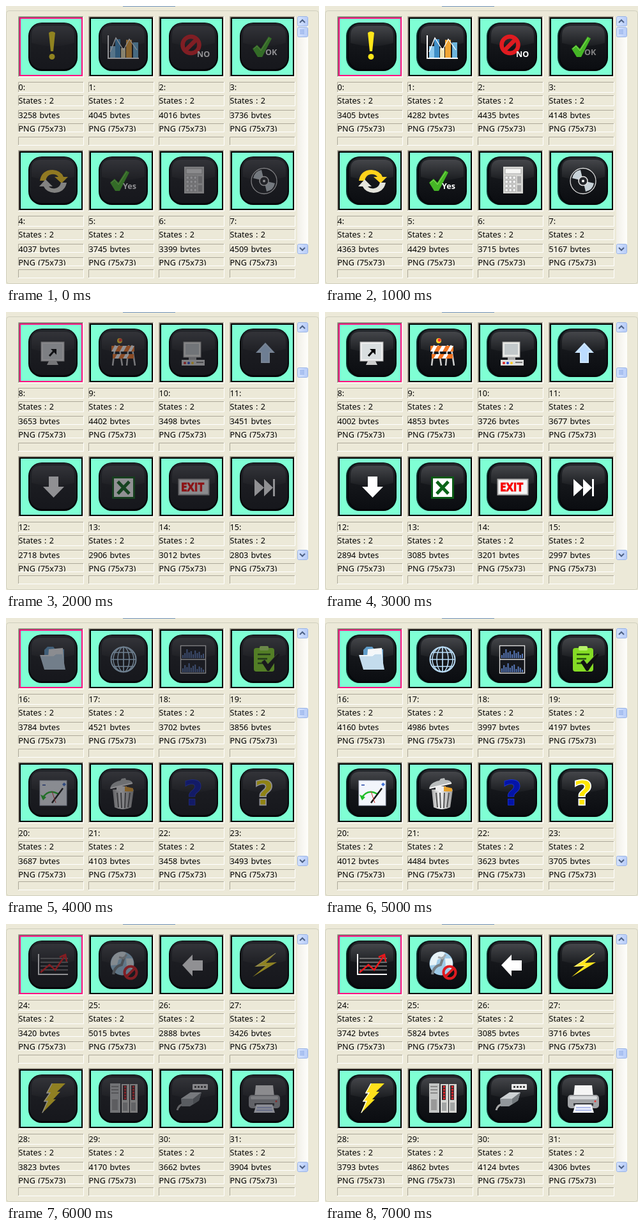
These frames come from a looping animation (490 px wide and 436 px high, 8000 ms). An HTML page:

```html
<!DOCTYPE html>
<html lang="en">
<head>
<meta charset="utf-8">
<title>Button browser</title>
<style>
html, body { margin: 0; width: 100%; height: 100%; overflow: hidden; background: #ece9d8; }
svg { display: block; }
text { font: 12.6px "Noto Sans", sans-serif; word-spacing: 1px; white-space: pre; }
.tag { font: bold 12.6px "Open Sans", sans-serif; }
.exit { font: bold 17px "Open Sans", sans-serif; stroke: #e00; stroke-width: .8; }
.query { font: bold 54px "DejaVu Sans", sans-serif; text-anchor: middle; }
.veil, .dim .glow { display: none; }
.dim .veil { display: block; }
.dim .ok { fill: #fff; }
</style>
</head>
<body>
<svg width="490" height="436" viewBox="0 0 490 436">
  <defs>
    <linearGradient id="plate" x2="0" y2="1">
      <stop stop-color="#25272c"/><stop offset=".45" stop-color="#15171b"/><stop offset="1" stop-color="#0b0d11"/>
    </linearGradient>
    <linearGradient id="gloss" x2="0" y2="1">
      <stop stop-color="#fff" stop-opacity=".15"/><stop offset="1" stop-color="#fff" stop-opacity=".03"/>
    </linearGradient>
    <linearGradient id="metal"><stop stop-color="#aaa"/><stop offset=".4" stop-color="#f4f4f4"/><stop offset="1" stop-color="#999"/></linearGradient>
    <linearGradient id="knob"><stop stop-color="#d6e4ff"/><stop offset="1" stop-color="#b6cbf8"/></linearGradient>
    <linearGradient id="track"><stop stop-color="#f1efe8"/><stop offset="1" stop-color="#fefefb"/></linearGradient>
  </defs>
  <path d="M183 .5h82" stroke="#7396c0"/>
  <rect x=".5" y="7.5" width="489" height="428" rx="4" fill="none" stroke="#cfcebd"/>
  <g id="view"></g>
</svg>
<script>
const fill = (d, color) => `<path d="${d}" fill="${color}"/>`;
const line = (d, color, w = 1) => `<path d="${d}" fill="none" stroke="${color}" stroke-width="${w}"/>`;
const rect = (x, y, w, h, color, extra = '') => `<rect x="${x}" y="${y}" width="${w}" height="${h}" fill="${color}" ${extra}/>`;
const disc = (x, y, r, color, extra = '') => `<circle cx="${x}" cy="${y}" r="${r}" fill="${color}" ${extra}/>`;
const label = (x, y, s, color = '#000', cls = '', extra = '') => `<text x="${x}" y="${y}" fill="${color}" class="${cls}" ${extra}>${s}</text>`;
const repeat = (n, draw) => Array.from({ length: n }, (_, i) => draw(i)).join('');

const check = dx => fill(`M${55 + dx} 67l7-6 6 6 12-19 5 3-15 29h-7z`, '#45b526') +
  line(`M${57 + dx} 67l5-4 6 7 13-20`, '#8de05a');
const forbid = (x, y, r, w) => disc(x, y, r, 'none', `stroke="#e01b20" stroke-width="${w}"`) +
  line(`M${x - r * .7} ${y + r * .7}L${x + r * .7} ${y - r * .7}`, '#e01b20', w);
const bars = (y, heights) => heights.map((h, i) => rect(56 + i * 3.2, y - h, 2, h, '#5878b8')).join('');

// Glyphs share the coordinates of the first cell.
const glyphs = [
  () => fill('M67 42q5-4 10 0l-3 29h-4z', '#ffe619') + disc(72, 79.5, 4.5, '#ffe619'),
  () => rect(53, 63, 8, 18, '#8cc8ec') + rect(61, 52, 8, 29, '#3f8fc8') + rect(70, 66, 7, 15, '#f0e3b4') +
    rect(78, 53, 9, 28, '#f0a535') + rect(89, 57, 8, 24, '#6db4dc') +
    line('M50 46v36h48', '#fff', 2) + line('M53 72l9-22 12 19 9-17 12 17', '#fff', 1.3),
  () => forbid(69.5, 61, 13, 6.5) + label(79, 80, 'NO', '#fff', 'tag'),
  () => check(0) + label(75, 77, 'OK', '#858585', 'tag ok'),
  () => fill('M53 64Q56 47 73 47 86 48 90 58h7l-10 10-11-10h6q-4-5-11-4-7 1-9 10z', '#ffd21c') +
    fill('M95 67Q92 82 76 83 63 82 59 73h-7l10-11 11 11h-6q4 4 10 3 7-1 9-9z', '#e4e4dc'),
  () => check(-2) + label(73, 77, 'Yes', '#fff', 'tag'),
  () => rect(59, 42, 31, 42, '#d6d6d3') + rect(62, 45, 25, 8, '#f6f6f4', 'stroke="#aaa"') +
    repeat(12, i => rect(62 + i % 3 * 6, 57 + (i / 3 | 0) * 6.5, 4.5, 4.5, '#f4f4f4', 'stroke="#999" stroke-width=".7"')) +
    rect(81, 57, 6, 11, '#aaa') + rect(81, 71, 6, 10, '#aaa'),
  () => disc(73, 64.5, 20, '#191b1f', 'stroke="#ddd" stroke-width="1.3"') +
    fill('M73 64L56 60Q58 49 69 47zM73 64l17 4Q88 79 77 81z', '#c8d2d8') +
    disc(73, 64.5, 7, '#24262b', 'stroke="#e4e4e4" stroke-width="1.5"') + disc(73, 64.5, 2, '#fff'),
  () => rect(55, 47, 36, 30, '#eee', 'stroke="#aaa"') + rect(58, 50, 30, 24, '#d9dedf') +
    fill('M67 77h12l3 6H64z', '#ccc') + line('M68 69l8-9', '#000', 3) + fill('M70 58h9v9z', '#000'),
  () => line('M61 52l-4 32M67 52l5 32M82 52l-3 32M87 52l5 32', '#cfcfcf', 2.5) +
    rect(55, 53, 36, 9, '#f47522') + rect(57, 66, 33, 7, '#f47522') +
    fill('M60 53h6l-5 9h-6zM73 53h6l-5 9h-6zM86 53h5l-5 9h-5zM64 66h6l-4 7h-6zM77 66h6l-4 7h-6z', '#fff') +
    disc(68, 45, 4, '#ffd52a') + disc(69, 44, 2.5, '#f33'),
  () => rect(58, 47, 27, 24, '#e9e9e6', 'stroke="#999"') + rect(61, 50, 21, 17, '#c2c8ca') + rect(66, 71, 12, 4, '#aaa') +
    rect(55, 75, 36, 9, '#ddd') + disc(60, 80, 2, '#d22') + disc(66, 80, 2, '#24c') + disc(72, 80, 2, '#fc2') + rect(78, 78, 11, 2, '#777'),
  () => fill('M75 48l15 16h-8v16H68V64h-8z', '#bcdcff') + line('M75 50l12 13h-6v16H69V63h-6z', '#e4f2ff'),
  () => fill('M67 48h15v16h9L74.5 81 58 64h9z', '#fff'),
  () => rect(57.5, 49.5, 33, 32, '#fff', 'stroke="#0a5a14" stroke-width="3"') + line('M65 56l18 19M83 56L65 75', '#0b6418', 5),
  () => rect(50.5, 52.5, 47, 24, '#f6f6f6', 'stroke="#aaa" stroke-width="2"') + label(54, 70.5, 'EXIT', '#f00', 'exit'),
  () => fill('M58 52l15 13.5L58 79zM73 52l14 13.5L73 79zM87 52h3v27h-3z', '#fff'),
  () => fill('M60 50l5-5h9l3 4h14v26H60z', '#5f9cc9') + fill('M67 49l22-2 2 26H65z', '#f5f7f9') +
    fill('M53 58h21l4-3h10l5 26H60z', '#c4dced') + line('M54 59h20l4-3h10', '#fff', 1.5),
  () => disc(74, 65, 19.5, 'none', 'stroke="#b9dcf6" stroke-width="2"') +
    line('M74 45v40M54 65h40M58 54h32M58 76h32', '#b9dcf6', 1.7) +
    [9, 16].map(r => `<ellipse cx="74" cy="65" rx="${r}" ry="19.5" fill="none" stroke="#b9dcf6" stroke-width="1.5"/>`).join(''),
  () => rect(53.5, 43.5, 39, 43, '#15171c', 'stroke="#ddd" stroke-width="1.4"') + line('M53 65h40', '#ddd', 1.4) +
    bars(63, [5, 8, 14, 9, 11, 6, 12, 8, 10, 5, 7]) + bars(85, [6, 11, 8, 14, 7, 10, 12, 5, 9, 7, 4]),
  () => rect(57, 47, 32, 37, '#85dc25', 'rx="4"') + rect(66, 44, 14, 7, '#b6f06a', 'rx="2"') +
    line('M63 57h20M63 64h15M63 71h12', '#27540c', 2.5) +
    fill('M69 69l5-4 5 7 15-16 4 1-17 26h-3z', '#111') + line('M69 69l5-4 5 7 15-16', '#699d48', .7),
  () => rect(53, 45, 42, 39, '#f2f5fb', 'stroke="#b5bdcf"') + line('M57 52h5', '#5670bb', 2) + fill('M88 51l3-3 3 3-3 3z', '#4374d8') +
    line('M57 73q9-16 25-7', '#20bd28', 2.5) + line('M72 80l17-23', '#151515', 2.5) + line('M72 62l6 18', '#c33') + fill('M54 67l4 9 5-5z', '#20bd28'),
  () => fill('M57 59h33l-4 28q-13 6-26 0z', 'url(#metal)') + line('M64 64l2 23M70 64l1 24M77 64l-1 24M84 64l-3 23', '#555', 2) +
    rect(63, 54, 16, 7, '#eee') + fill('M76 54l13 3v5H76z', '#e7a22d') +
    fill('M53 58q1-10 16-13l2-3 6-1 1 3q9 0 10 5z', '#b9bdbd') + line('M54 57l34-8', '#f4f4f4', 2),
  () => label(73, 83, '?', '#0414a8', 'query', 'stroke="#1d35d8" stroke-width=".8"'),
  () => label(73, 83, '?', '#ffe600', 'query', 'stroke="#fff" stroke-width="1.8"'),
  () => line('M54 54h43M54 60h43M54 66h43M54 72h43', '#888', 1.3) + line('M51 47v32h46', '#fff', 2) +
    line('M54 76l14-12 9 8 15-22', '#e8181c', 2.5) + line('M84 52l9-4 2 11', '#e8181c', 2.5),
  () => disc(72, 62, 18.5, '#9fcbe8') + fill('M60 48q9-7 18-3l-4 8-8 3-2 8-10 1q0-10 6-17zM78 54h10q4 10-1 17l-8-4z', '#e8f3f7') +
    line('M58 79q2-13 13-15l4-12', '#777f84', 4) + line('M67 52l7 2 5-6', '#a7adb0', 3) + forbid(85, 76, 9.5, 4),
  () => fill('M56 64.5L72 48v9h16v16H72v9z', '#fff'),
  () => fill('M92 45L58 67l17-1-20 17 38-23-17 1z', '#ffe61c') + line('M91 46L61 66l16-1', '#fff7a8'),
  () => fill('M72 40h21L80 53h5L74 65h4L56 87l8-19h-5l9-13h-5z', '#ffe01c') + line('M72 40l-8 15h5l-9 13h5l-8 18', '#fff', 1.3),
  () => rect(53, 40, 16, 46, '#c4c6c5') + line('M55 45h11M55 50h11M55 55h11', '#777', 1.5) + rect(56, 65, 9, 17, '#999') +
    [71, 84].map(x => rect(x, 41, 12, 45, '#d5d5d2') + rect(x + 2, 43, 6, 23, '#34262a') +
      repeat(5, i => rect(x + 4, 44 + i * 4.5, 3, 3, '#e3262c')) + rect(x + 2, 70, 7, 13, '#a3a5a5')).join(''),
  () => rect(72, 41, 24, 9, '#ececec', 'rx="1"') + repeat(4, i => rect(75 + i * 5, 44, 3, 3, '#444')) +
    line('M62 71q-12 2-14 11', '#aaa', 3) + fill('M54 64l15-10h17l-4 13-14 9H55z', '#92979b') + fill('M54 64l15-10h17l-13 10z', '#cdd1d3') + fill('M73 64l13-10-4 13-9 6z', '#73797d'),
  () => fill('M60 43h27l2 18H58z', '#f5f5f5') + rect(49, 58, 49, 21, '#a2a4a7', 'rx="5"') + rect(52, 60, 43, 5, '#d8dadc', 'rx="2"') +
    rect(58, 71, 31, 4, '#37393d') + fill('M61 73h25l4 13H57z', '#f2f5ff') + line('M62 78h23M61 82h25', '#6f83d8') + disc(92, 68, 1.5, '#e33')
];

const dimBytes = [
  3258, 4045, 4016, 3736, 4037, 3745, 3399, 4509, 3653, 4402, 3498, 3451, 2718, 2906, 3012, 2803,
  3784, 4521, 3702, 3856, 3687, 4103, 3458, 3493, 3420, 5015, 2888, 3426, 3823, 4170, 3662, 3904
];
const litBytes = [
  3405, 4282, 4435, 4148, 4363, 4429, 3715, 5167, 4002, 4853, 3726, 3677, 2894, 3085, 3201, 2997,
  4160, 4986, 3997, 4197, 4012, 4484, 3623, 3705, 3742, 5824, 3085, 3716, 3793, 4862, 4124, 4306
];

const sunken = (x, y, w, h) => line(`M${x + .5} ${y + h}V${y + .5}H${x + w}`, '#aca899') +
  line(`M${x} ${y + h + .5}H${x + w + .5}V${y}`, '#fff');
const field = (y, h, baseline, s) => sunken(19, y, 102, h) +
  `<svg x="19" y="${y}" width="102" height="${h}">${label(.5, baseline - y, s)}</svg>`;

function cell(slot, index, bytes) {
  const x = [0, 110, 220, 331][slot % 4], y = slot < 4 ? 0 : 210;
  return `<g transform="translate(${x} ${y})">` + sunken(19, 16, 102, 95) + line('M20.5 110V17.5H120', '#716f64') +
    rect(22, 19, 97, 90, '#7fffd4', `stroke="${slot ? '#000' : '#ff1082'}" stroke-width="2"`) +
    rect(33, 26, 76, 76, '#0a2f2a', 'rx="21" class="glow"') +
    rect(35, 26, 77, 76, '#06070a', 'rx="21"') +
    rect(37, 27, 73, 72, 'url(#plate)', 'rx="19"') +
    fill('M40 58V46q0-15 15-15h37q15 0 15 15v12q-33 10-67 0z', 'url(#gloss)') +
    glyphs[index]() +
    rect(37, 27, 73, 72, '#222328', 'rx="19" opacity=".5" class="veil"') +
    field(119, 16, 132, index + ':') + field(140, 16, 153, 'States : 2') +
    field(163, 13, 176, bytes + ' bytes') + field(184, 13, 197, 'PNG (75x73)') + field(slot < 4 ? 205 : 203, 13, 0, '') + '</g>';
}

const knob = (y, mark) => rect(456.5, y + .5, 16, 15, 'url(#knob)', 'rx="2" stroke="#9ab4e4"') + mark;

function scrollbar(page) {
  const y = Math.round(33.4 + 53.7 * page);
  return rect(456, 16, 17, 373, 'url(#track)') +
    knob(16, line('M460 26l4-4 4 4', '#4d6185', 2)) +
    knob(373, line('M460 379l4 4 4-4', '#4d6185', 2)) +
    knob(y, repeat(4, i => line(`M460 ${y + 4.5 + i * 2}h7`, '#8caae6')));
}

const view = document.getElementById('view');
let shown = -1;

function tick(now) {
  const step = Math.floor(now / 1000) % 8;
  if (step !== shown) {
    shown = step;
    const page = step >> 1, lit = step % 2;
    view.setAttribute('class', lit ? '' : 'dim');
    view.innerHTML = scrollbar(page) + repeat(8, slot => {
      const index = page * 8 + slot;
      return cell(slot, index, (lit ? litBytes : dimBytes)[index]);
    });
  }
  requestAnimationFrame(tick);
}
tick(performance.now());
</script>
</body>
</html>
```
